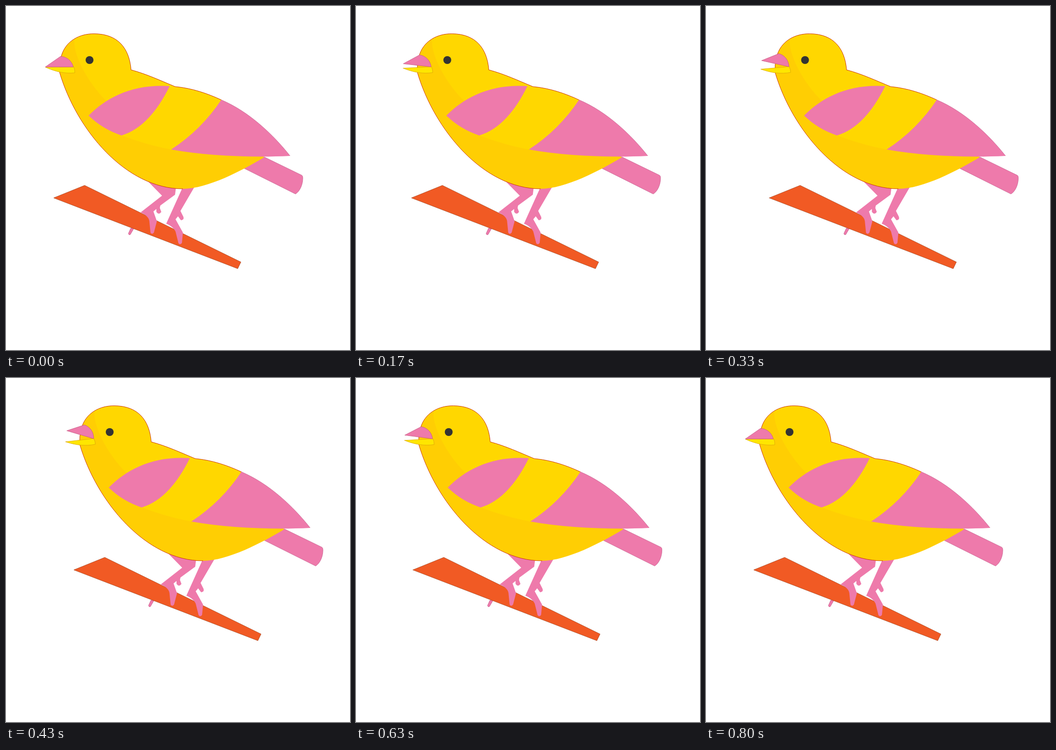
An HTML page with a canvas that plays this animation: 700x700 px, repeating every 0.83 s.

```html
<!DOCTYPE html>
<html lang="en">
<head>
<meta charset="utf-8">
<title>Singing bird</title>
<style>
html, body { margin: 0; width: 100%; height: 100%; overflow: hidden; background: #fff; }
canvas { display: block; width: 700px; height: 700px; }
</style>
</head>
<body>
<canvas id="stage" width="700" height="700"></canvas>
<script>
const ctx = document.getElementById('stage').getContext('2d');

const YELLOW = '#ffd700', AMBER = '#ffce03', LEMON = '#ffe600';
const PINK = '#ee7aab', ORANGE = '#f15a24', DARK = '#333333';
const RUST = '#cc3d0c', PLUM = '#c75f8f';
const LOOP = 830, PEAK = 13, LAST = 24, TRAVEL = 41;

const bodyEdge = `M360 372 C243 372 143 251 109 135 Q108 119 112 104
  C120 71 150 56 180 56.5 C228 57 251 86 254.5 130
  C285 138 315 152 344 164 C378 167 410 178 438 191`;
const bodyRim = new Path2D(bodyEdge);
const body = new Path2D(bodyEdge + 'L525 308 C480 335 410 372 360 372Z');
const back = new Path2D(`M139 72 C138 100 165 155 205 194 L235 263.5
  C270 276 303 286 336 292 L470 250 L470 40 L139 40Z`);
const shoulder = new Path2D(`M168 223 C205 185 260 158 333 163
  C308 214 276 251 235 263.5 C210 255 188 242 168 223Z`);
const wingEdge = 'M438 191 C495 215 545 263 578 305';
const wingRim = new Path2D(wingEdge);
const wing = new Path2D(wingEdge + 'C500 309 410 305 336 292 C378 265 412 230 438 191Z');
const tail = new Path2D('M484 330 L525 307 L602 344.5 Q604 345.5 604 350 C604 365 597 378 589 382.5Z');
const branch = new Path2D('M97 390.5 L160 365 L478 521 L471.5 534.5Z');
const claw = new Path2D('M254 452 L260 453 L253 465 Q250 467 249 463Z');
const rearLeg = new Path2D(`M288 356 L317.5 386 L274 420 C287 426 292 432 292 441
  L294 461 Q297 466 301 461 L307 438 L300 418 L306 413 L306 419
  Q311 426 316 419 L313 411 L314 406 L344 384 L346 368Z`);
const frontLeg = new Path2D(`M359 370 L383 369 L355 417 L361 429 Q363 435 356 436
  L350 428 L345 434 L360 461 L358 482 Q355 487 351 483
  L345 459 C342 452 334 446 326 443Z`);
const upperBeak = new Path2D('M80 124 L111 102.5 C124 103 134 112 137 124Z');
const lowerBeak = new Path2D('M80 124.5 L138 124 Q140.5 130 140 136 C120 138 101 134 80 124.5Z');

function outline(path, color, width = 0.8) {
  ctx.strokeStyle = color;
  ctx.lineWidth = width;
  ctx.stroke(path);
}

function shape(path, fill, edge) {
  ctx.fillStyle = fill;
  ctx.fill(path);
  if (edge) outline(path, edge);
}

function turned(path, fill, edge, x, y, degrees) {
  ctx.save();
  ctx.translate(x, y);
  ctx.rotate(degrees * Math.PI / 180);
  ctx.translate(-x, -y);
  shape(path, fill, edge);
  ctx.restore();
}

function draw(progress) {
  ctx.fillStyle = '#fff';
  ctx.fillRect(0, 0, 700, 700);
  ctx.save();
  ctx.translate(TRAVEL * progress, 0);

  shape(tail, PINK, PLUM);
  shape(claw, PINK, PLUM);
  shape(branch, ORANGE, '#a8431c');
  shape(rearLeg, PINK);
  shape(frontLeg, PINK);

  shape(body, AMBER);
  ctx.save();
  ctx.clip(body);
  shape(back, YELLOW);
  ctx.restore();
  outline(bodyRim, RUST, 1);
  shape(shoulder, PINK);
  shape(wing, PINK);
  outline(wingRim, PLUM);

  turned(lowerBeak, LEMON, '#dca608', 130, 127, -6 * progress);
  turned(upperBeak, PINK, '#c95b83', 139, 125, 16.5 * progress);

  ctx.fillStyle = DARK;
  ctx.beginPath();
  ctx.arc(170, 110, 8, 0, Math.PI * 2);
  ctx.fill();
  ctx.restore();
}

// Thirty poses per second, with starts rounded to 10 ms.
function tick(now) {
  const step = Math.floor((Math.floor(now % LOOP / 10) * 3 + 1) / 10);
  draw(step <= PEAK ? step / PEAK : (LAST - step) / (LAST - PEAK));
  requestAnimationFrame(tick);
}

draw(0);
requestAnimationFrame(tick);
</script>
</body>
</html>
```
